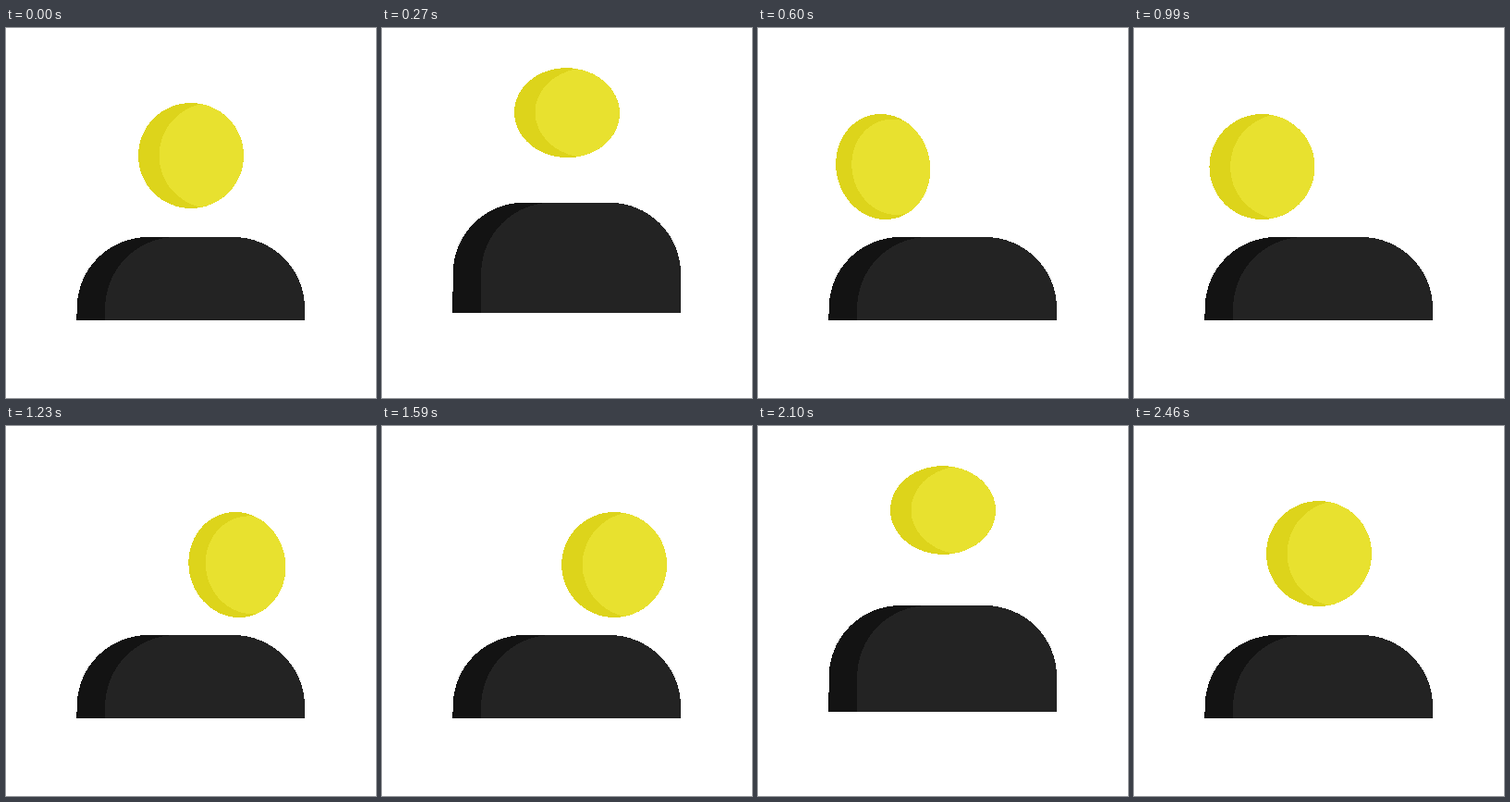
An HTML page for the animation above (4.52 s loop, 400 px wide and 400 px high).

```html
<!DOCTYPE html>
<html lang="en">
<head>
<meta charset="utf-8">
<title>User icon</title>
<style>
  html, body { margin: 0; width: 100%; height: 100%; overflow: hidden; background: #fff; }
  svg { display: block; width: 100%; height: 100%; }
</style>
</head>
<body>
<svg viewBox="0 0 400 400" shape-rendering="crispEdges">
  <path id="bodyShade" fill="#131313"/>
  <path id="bodyLight" fill="#232323"/>
  <g id="head">
    <circle r="1" fill="#ddd41b"/>
    <path id="headLight" fill="#e8e12f"/>
  </g>
</svg>
<script>
const LOOP = 4520, STEP = 30;
const RADIUS = 57, REACH = 46;
const $ = id => document.getElementById(id);

const clamp = u => Math.min(1, Math.max(0, u));
const progress = (t, start, length) => clamp((t - start) / length);
const smooth = u => u * u * (3 - 2 * u);
const pulse = u => Math.sin(Math.PI * u) ** 2;

// Two hops; the body follows the head a little later
const hops = [0, 1780];

// Head turns between the left (-1), the middle (0) and the right (1)
const turns = [
  { start: 300, from: 0, to: -1, over: 0.59 },
  { start: 930, from: -1, to: 1, over: 0.45 },
  { start: 1560, from: 1, to: 0, over: 0 }
];

// Wind up outwards, slide across, overshoot and settle
function turnAt(t) {
  const { start, from, to, over } = turns.findLast(k => t >= k.start) || turns[0];
  const windUp = 0.45 * from * pulse(progress(t, start, 180));
  const slide = (to - from) * smooth(progress(t, start + 60, 330));
  const landing = over * pulse(progress(t, start + 180, 240));
  return { side: from + windUp + slide + to * landing, landing };
}

function hopAt(t) {
  const start = hops.findLast(s => t >= s);
  const u = progress(t, start, 600);
  return {
    lift: pulse(u),
    stretch: pulse(2 * u),
    bodyLift: 37.4 * pulse(progress(t, start + 45, 440))
  };
}

// Part of the unit circle covered by a second circle at x = c with radius r
function lens(c, r) {
  const x = (1 + c * c - r * r) / (2 * c), y = Math.sqrt(1 - x * x);
  return `M${x} ${-y}A${r} ${r} 0 ${+(x > c)} 0 ${x} ${y}A1 1 0 0 0 ${x} ${-y}Z`;
}

function bodyPath(lift, inset) {
  const top = 226 - lift, bottom = 316 - lift * 0.215, y = top + 77;
  const left = 76.3 + inset;
  return `M${left} ${bottom}L${left + 0.4} ${y}A77 77 0 0 1 ${left + 77} ${top}` +
    `H245.5A77.5 77 0 0 1 323 ${y}V${bottom}Z`;
}

function draw(time) {
  const t = Math.floor(time / STEP) * STEP;
  const { side, landing } = turnAt(t);
  const { lift, stretch, bodyLift } = hopAt(t);

  const x = 200 + REACH * side;
  const y = 138 + 12 * Math.min(1, Math.abs(side)) - 47.5 * lift;
  const rx = RADIUS - 10 * landing;
  const ry = RADIUS + 10 * stretch - 9.7 * lift;
  const tilt = 2.4 * landing + 3.2 * stretch;
  $("head").setAttribute("transform", `matrix(${rx} ${tilt} ${tilt} ${ry} ${x} ${y})`);
  $("headLight").setAttribute("d", lens(0.395 - 0.26 * landing, 1 - 0.16 * landing));

  $("bodyShade").setAttribute("d", bodyPath(bodyLift, 0));
  $("bodyLight").setAttribute("d", bodyPath(bodyLift, 30.5));
}

const start = performance.now();
function tick() {
  draw((performance.now() - start) % LOOP);
  requestAnimationFrame(tick);
}
tick();
</script>
</body>
</html>
```
